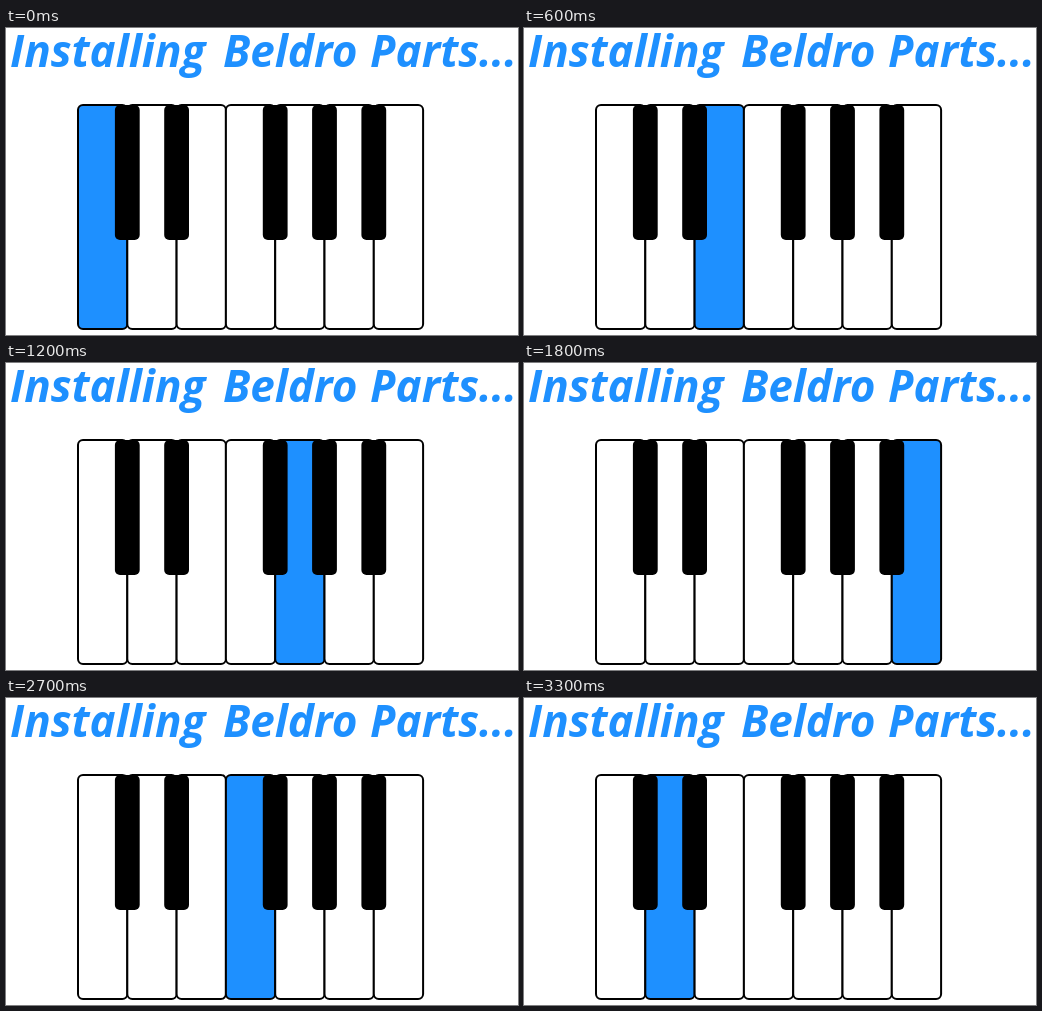
An HTML page for the animation above (3.6 s loop, 512 by 307 pixels).

```html
<!DOCTYPE html>
<html lang="en">
<head>
<meta charset="utf-8">
<title>Installing</title>
<style>
  html, body { margin: 0; width: 100%; height: 100%; overflow: hidden; background: #fff; }
  svg { display: block; width: 100vw; height: 100vh; }
  text { font: italic bold 44px "Open Sans", "Noto Sans", sans-serif; fill: #1e90ff; }
  .white { fill: #fff; stroke: #000; stroke-width: 2; }
  .white.on { fill: #1e90ff; }
</style>
</head>
<body>
<svg viewBox="0 0 512 307">
  <text x="4" y="39">Installing</text>
  <text x="217" y="39">Beldro</text>
  <text x="364" y="39">Parts...</text>
  <g id="keys"></g>
</svg>
<script>
  const LEFT = 72, TOP = 77, PITCH = 49.3, COUNT = 7, STEP = 300;
  const keys = document.getElementById("keys");

  function addKey(cls, x, width, height, radius) {
    const key = document.createElementNS("http://www.w3.org/2000/svg", "rect");
    const attrs = { class: cls, x, y: TOP, width, height, rx: radius };
    for (const name in attrs) key.setAttribute(name, attrs[name]);
    return keys.appendChild(key);
  }

  const whites = Array.from({ length: COUNT }, (_, i) =>
    addKey("white", LEFT + i * PITCH, PITCH, 224, 5));
  for (const i of [1, 2, 4, 5, 6]) addKey("black", LEFT + i * PITCH - 12.4, 24.8, 135, 5);

  // The lit key runs up the keyboard and back down.
  function draw(now) {
    const span = 2 * (COUNT - 1);
    const step = Math.floor(now / STEP) % span;
    const lit = Math.min(step, span - step);
    whites.forEach((key, i) => key.classList.toggle("on", i === lit));
  }

  const start = performance.now();
  function tick() {
    draw(performance.now() - start);
    requestAnimationFrame(tick);
  }
  tick();
</script>
</body>
</html>
```
